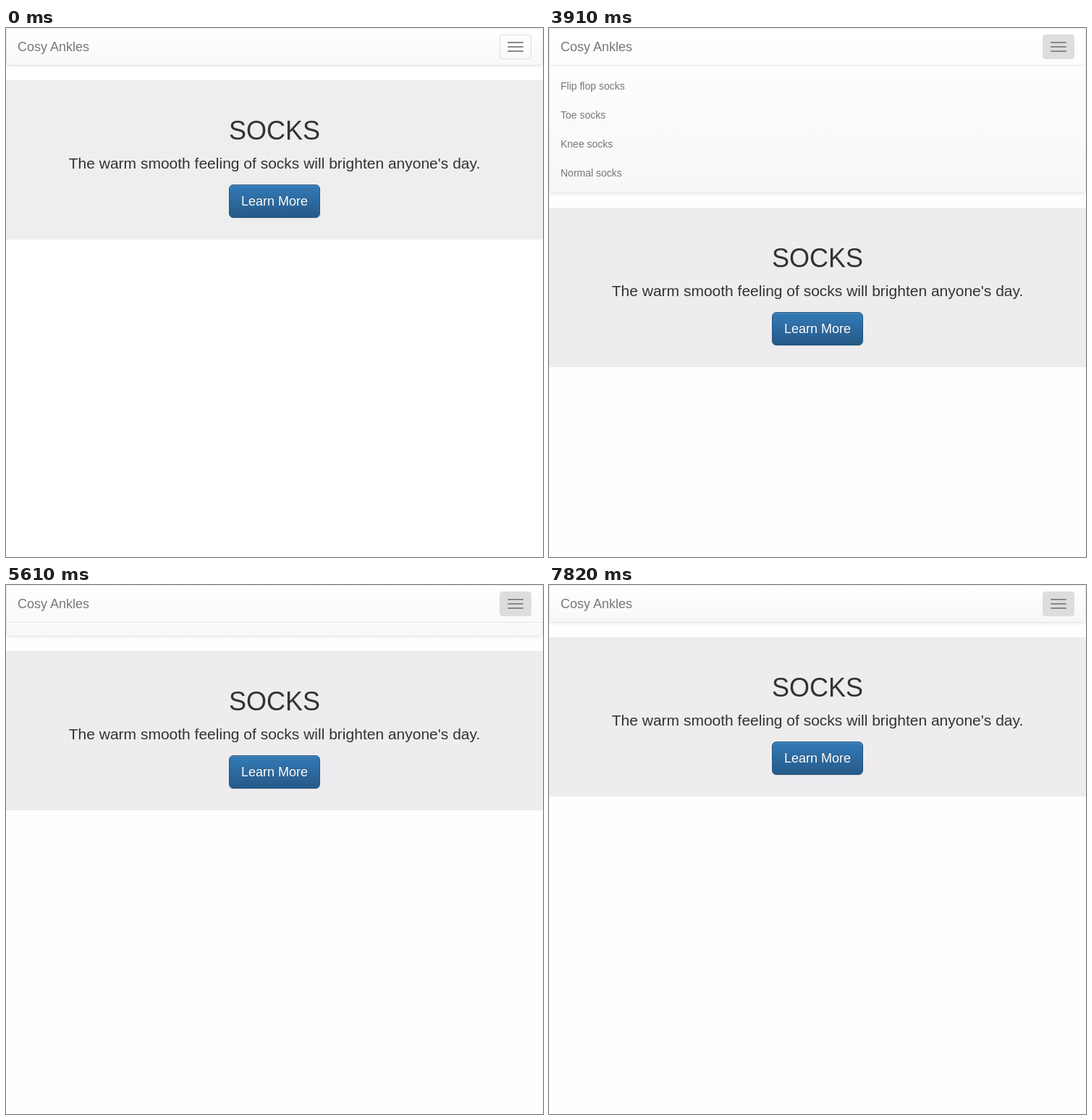
Write an HTML page that moves like this. It is 742 px wide and 730 px high and loops after 7.99 s.

```html
<!DOCTYPE html>
<html lang="en">
<head>
<meta charset="utf-8">
<title>Socks</title>
<style>
* { box-sizing: border-box; }
html, body { margin: 0; width: 100%; height: 100%; overflow: hidden; }
body {
  --page: #fff; --panel: #eee; --fade: #f8f8f8;
  background: var(--page);
  color: #333;
  font: 14px/20px "Liberation Sans", Arial, sans-serif;
}
body.tinted { --page: #fefefe; --panel: #eeecef; --fade: #f8f6f9; }
nav {
  margin-bottom: 20px;
  border: 1px solid #e7e7e7;
  border-radius: 4px;
  background: linear-gradient(#fff, var(--fade)) no-repeat;
  box-shadow: inset 0 1px 0 rgba(255,255,255,.15), 0 1px 5px rgba(0,0,0,.075);
  color: #777;
  text-shadow: 0 1px 0 rgba(255,255,255,.25);
}
.head { position: relative; height: 50px; padding: 15px; font-size: 18px; }
.toggle {
  position: absolute; top: 8px; right: 15px;
  width: 44px; height: 34px; padding: 9px 10px;
  border: 1px solid #ddd; border-radius: 4px;
}
.toggle.hover { background: #ddd; }
.toggle i { display: block; height: 2px; margin-bottom: 4px; border-radius: 1px; background: #888; }
.menu { overflow: hidden; border-top: 1px solid #e7e7e7; box-shadow: inset 0 1px 0 rgba(255,255,255,.1); }
ul { margin: 7.5px 0; padding: 0; list-style: none; }
li { padding: 10px 15px; }
.hero { height: 220px; padding: 30px 0; background: var(--panel); text-align: center; }
h1 { margin: 20px 0 10px; font-size: 36px; font-weight: 400; line-height: 1.1; }
p { margin: 0 0 15px; font-size: 21px; line-height: 1.4; white-space: nowrap; }
.button {
  display: inline-block;
  padding: 10px 16px;
  border: 1px solid #245580; border-radius: 6px;
  background: linear-gradient(#337ab7, #265a88);
  box-shadow: inset 0 1px 0 rgba(255,255,255,.15), 0 1px 1px rgba(0,0,0,.075);
  color: #fff;
  font-size: 18px; line-height: 24px;
  text-shadow: 0 -1px 0 rgba(0,0,0,.2);
}
</style>
</head>
<body>
<nav>
  <div class="head">Cosy Ankles<div class="toggle"><i></i><i></i><i></i></div></div>
  <div class="menu">
    <ul><li>Flip flop socks</li><li>Toe socks</li><li>Knee socks</li><li>Normal socks</li></ul>
  </div>
</nav>
<div class="hero">
  <h1>SOCKS</h1>
  <p>The warm smooth feeling of socks will brighten anyone's day.</p>
  <div class="button">Learn More</div>
</div>
<script>
const LOOP = 7990, STEP = 170, SLIDE = 350, MENU_HEIGHT = 176;
const TINT_AT = 2550, HOVER_AT = 2890;
// Click times: each one flips the menu between closed and open.
const CLICKS = [3040, 4090, 5572, 6710];

const menu = document.querySelector(".menu");
const toggle = document.querySelector(".toggle");

const bezier = (a, b, s) => 3 * (1 - s) ** 2 * s * a + 3 * (1 - s) * s * s * b + s ** 3;

// The standard CSS "ease" curve, solved by bisection.
function ease(x) {
  if (x <= 0) return 0;
  if (x >= 1) return 1;
  let low = 0, high = 1;
  for (let i = 0; i < 24; i++) {
    const mid = (low + high) / 2;
    if (bezier(0.25, 0.25, mid) < x) low = mid; else high = mid;
  }
  return bezier(0.1, 1, low);
}

function openness(t) {
  return CLICKS.reduce((sum, at, i) => sum + (i % 2 ? -1 : 1) * ease((t - at) / SLIDE), 0);
}

function draw(t) {
  const height = Math.round(MENU_HEIGHT * openness(t));
  menu.style.display = height > 0 ? "block" : "none";
  menu.style.height = height + "px";
  toggle.classList.toggle("hover", t >= HOVER_AT);
  document.body.classList.toggle("tinted", t >= TINT_AT);
}

const start = performance.now();
function tick() {
  const t = (performance.now() - start) % LOOP;
  draw(Math.floor(t / STEP) * STEP);
  requestAnimationFrame(tick);
}
draw(0);
requestAnimationFrame(tick);
</script>
</body>
</html>
```
